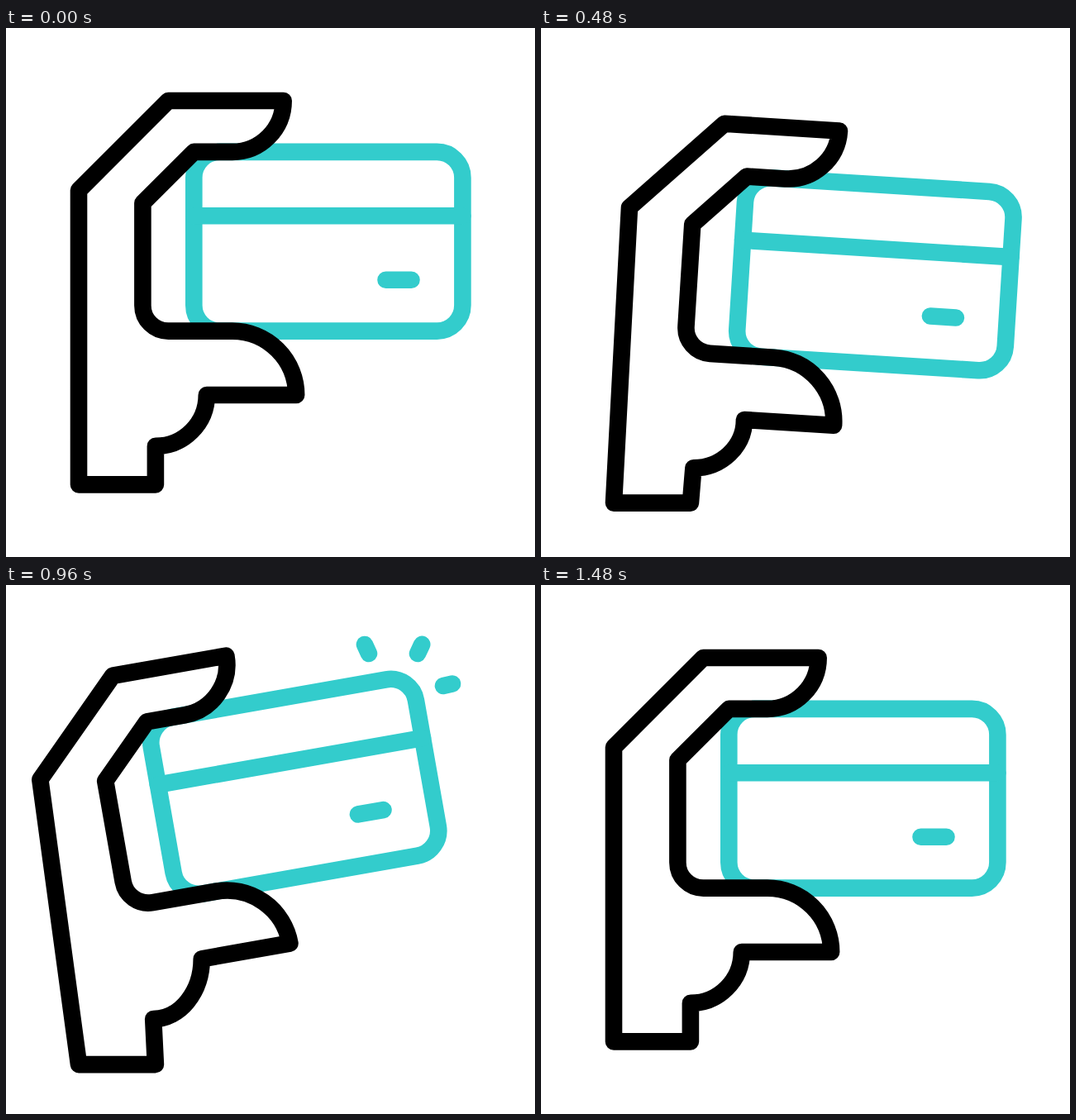
Recreate the animation shown at these times as an HTML page. Size 640x640 px, loop 1.84 s.

```html
<!DOCTYPE html>
<html lang="en">
<head>
<meta charset="utf-8">
<title>Card payment</title>
<style>
  html, body { margin: 0; width: 100%; height: 100%; overflow: hidden; background: #fff; }
  svg { display: block; width: 100%; height: 100%; }
  svg * { fill: none; stroke: #3cc; stroke-width: 20.6; stroke-linecap: round; stroke-linejoin: round; }
  #hand { stroke: #000; }
</style>
</head>
<body>
<svg viewBox="0 0 640 640">
  <g id="card">
    <rect x="227.3" y="149.9" width="325.1" height="216.7" rx="31"/>
    <path d="M227.3 227.3H552.4M459.5 304.7H490.5"/>
  </g>
  <path id="hand"/>
  <path id="sparks"/>
</svg>
<script>
const LOOP = 1840, STEP = 40, UNIT = 15.48, ORIGIN = 88;
const CARD = [389.85, 258.25], CUFF = [180.9, 505.9], WRIST_Y = 552.4;
// Two key poses; every point moves in a straight line between them and rest.
const FORWARD = { angle: 3.6, pivot: [121, 498], cuff: [3.5, 4.2] };
const BACK = { angle: -10, pivot: [129, 469], cuff: [-2.7, -8.6] };
const SPARKS = [[439, 83, 409, 17.3], [498, 83, 529, 16.5], [529, 122, 594.4, 107.3]];
const [card, hand, sparks] = ['card', 'hand', 'sparks'].map(id => document.getElementById(id));

const progress = (t, from, to) => Math.min(1, Math.max(0, (t - from) / (to - from)));
const smooth = (t, from, to) => { const u = progress(t, from, to); return u * u * (3 - 2 * u); };
const easeOut = (t, from, to) => 1 - (1 - progress(t, from, to)) ** 2;

function turnOffset([px, py], { angle, pivot }) {
  const a = angle * Math.PI / 180, x = px - pivot[0], y = py - pivot[1];
  return [x * Math.cos(a) - y * Math.sin(a) - x, x * Math.sin(a) + y * Math.cos(a) - y];
}

// Returns a function that blends the key poses for a given moment.
function blender(forward, back, drop) {
  return (point, offset) => {
    const f = offset(FORWARD), b = offset(BACK);
    return [point[0] + forward * f[0] + back * b[0], point[1] + forward * f[1] + back * b[1] + drop];
  };
}

// The palm and fingers tilt; the wrist edge only slides vertically.
function handPath(blend, drop) {
  const grid = (col, row) => {
    const point = [ORIGIN + col * UNIT, ORIGIN + row * UNIT];
    return blend(point, pose => turnOffset(point, pose));
  };
  const arc = (size, sweep) => `A${size * UNIT} ${size * UNIT} 0 0 ${sweep} `;
  const heel = grid(10, 23), cuff = blend(CUFF, pose => pose.cuff);
  const k = 0.5523, bottom = WRIST_Y + drop;
  return `M${grid(7, 0)}L${grid(16, 0)}${arc(4, 1)}${grid(12, 4)}L${grid(9, 4)}L${grid(5, 8)}` +
    `L${grid(5, 16)}${arc(2, 0)}${grid(7, 18)}L${grid(12, 18)}${arc(5, 1)}${grid(17, 23)}L${heel}` +
    `C${heel[0]} ${heel[1] + k * (cuff[1] - heel[1])} ${cuff[0] + k * (heel[0] - cuff[0])} ${cuff[1]} ${cuff}` +
    `L${CUFF[0]} ${bottom}L${ORIGIN} ${bottom}L${grid(0, 7)}Z`;
}

function sparkPath(head, tail) {
  if (head <= 0 || tail >= 1) return '';
  return SPARKS.map(([x1, y1, x2, y2]) => {
    const at = u => `${x1 + (x2 - x1) * u} ${y1 + (y2 - y1) * u}`;
    return `M${at(tail)}L${at(head)}`;
  }).join('');
}

function draw(now) {
  const t = Math.floor(now % LOOP / STEP) * STEP;
  const swing = smooth(t, 546, 931);
  const forward = smooth(t, 75, 435) - swing, back = swing - smooth(t, 1060, 1430);
  const drop = 32.8 * (smooth(t, 120, 700) - smooth(t, 805, 1425));
  const blend = blender(forward, back, drop);
  const angle = forward * FORWARD.angle + back * BACK.angle;
  const [x, y] = blend(CARD, pose => turnOffset(CARD, pose));
  card.setAttribute('transform', `translate(${x} ${y}) rotate(${angle}) translate(${-CARD[0]} ${-CARD[1]})`);
  hand.setAttribute('d', handPath(blend, drop));
  sparks.setAttribute('d', sparkPath(easeOut(t, 935, 1220), easeOut(t, 1165, 1480)));
}

const start = performance.now();
function tick() {
  draw(performance.now() - start);
  requestAnimationFrame(tick);
}
tick();
</script>
</body>
</html>
```
